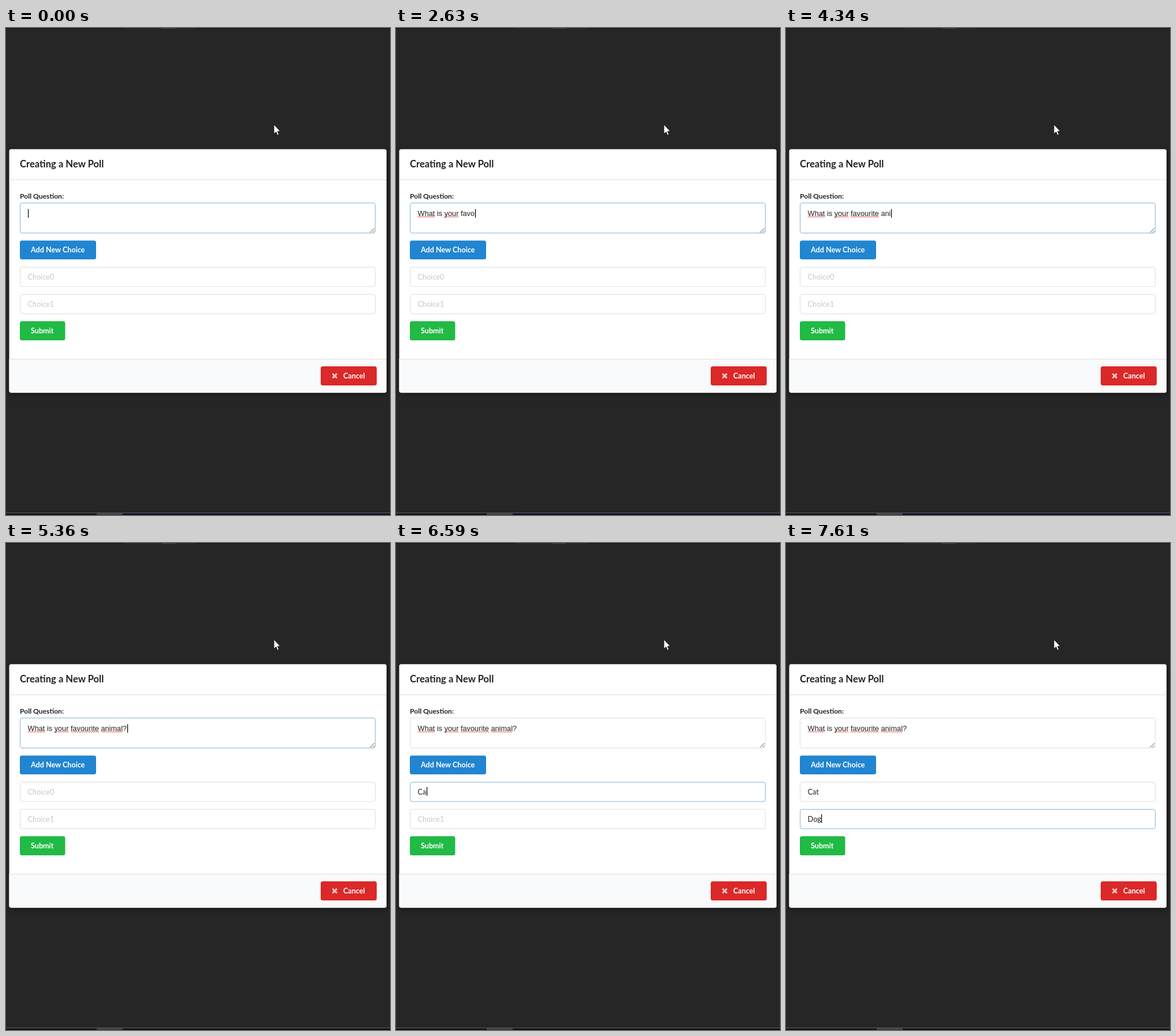
Write an HTML page that moves like this. It is 665 by 842 pixels and loops after 8000 ms.

```html
<!DOCTYPE html>
<html lang="en">
<head>
<meta charset="utf-8">
<title>New poll</title>
<style>
  html, body { margin: 0; width: 100%; height: 100%; overflow: hidden; background: #262626; }
  svg { display: block; }
  text { font: 12.7px Lato, sans-serif; fill: #212121; white-space: pre; }
  .bold { font-weight: 700; }
  .button { font-weight: 700; font-size: 12.6px; fill: #fff; }
  #question { font: 12.75px "Liberation Sans", Arial, sans-serif; }
  .field { fill: #fff; }
  .dialog { filter: drop-shadow(1px 3px 6px rgba(0, 0, 0, .4)); }
</style>
</head>
<body>
<svg width="665" height="842" viewBox="0 0 665 842">
  <defs>
    <pattern id="wave" width="4" height="3" y="325" patternUnits="userSpaceOnUse">
      <path d="M-1 1.5L0 2.5L2 .5L4 2.5L5 1.5" fill="none" stroke="#f02020" stroke-width=".9"/>
    </pattern>
  </defs>

  <rect width="665" height="842" fill="#262626"/>
  <path d="M0 .5H665" stroke="#121212"/>
  <path d="M205 .5H330" stroke="#1d2a1b"/>
  <path d="M270 .5H295" stroke="#35552f"/>
  <rect y="838" width="665" height="1" fill="#48688a"/>
  <rect y="839" width="665" height="3" fill="#15110f"/>
  <rect y="840" width="157" height="2" fill="#24100a"/>
  <rect x="157" y="839" width="45" height="3" fill="#493b37"/>

  <rect class="dialog" x="5.5" y="209.5" width="653.5" height="421" rx="3.5" fill="#fff"/>
  <path d="M5.5 572H659V627a3.5 3.5 0 0 1-3.5 3.5H9a3.5 3.5 0 0 1-3.5-3.5Z" fill="#f9fafb"/>
  <path d="M5.5 262.5H659M5.5 572.5H659" stroke="#dedede"/>
  <text class="bold" x="24" y="241" style="font-size:16.6px">Creating a New Poll</text>
  <text class="bold" x="24" y="295" style="font-size:12.1px">Poll Question:</text>

  <rect class="field" x="24.5" y="302.5" width="615" height="52" rx="3.5"/>
  <path d="M630.5 353.5L638 346M635 353.5L638 350.5" stroke="#555"/>
  <rect class="field" x="24.5" y="413.5" width="615" height="33.5" rx="3.5"/>
  <rect class="field" x="24.5" y="460.5" width="615" height="33.5" rx="3.5"/>
  <g id="squiggles" fill="url(#wave)"></g>
  <text id="question" x="37.6" y="325"></text>
  <text id="choice0" x="37.6" y="435"></text>
  <text id="choice1" x="37.6" y="482"></text>
  <rect id="caret" width="1.2" height="15" fill="#000"/>

  <rect x="24" y="367.5" width="132" height="32.5" rx="3.5" fill="#2185d0"/>
  <text class="button" x="43" y="388">Add New Choice</text>
  <rect x="24" y="507" width="78.5" height="33" rx="3.5" fill="#21ba45"/>
  <text class="button" x="43" y="528">Submit</text>
  <rect x="545" y="585" width="97" height="33" rx="3.5" fill="#db2828"/>
  <path d="M565.5 597.7L573 605.2M573 597.7L565.5 605.2" stroke="#f4c9c9" stroke-width="3"/>
  <text class="button" x="584" y="606">Cancel</text>

  <path d="M464 167V183L467.7 179.6L470.2 185.3L472.6 184.2L470.2 178.7H475Z"
        fill="#fff" stroke="#111" stroke-width=".8"/>
</svg>
<script>
const LOOP = 8000, FADE = 150;
const $ = id => document.getElementById(id);
const borders = document.querySelectorAll('.field');

// Each burst: typed text, time of its first key, time of its last key
const fields = [
  { node: $('question'), focus: -FADE, caretY: 313, hint: '', bursts: [
    ['W', 210], ['ha', 530, 680], ['t is ', 1000, 1380], ['your favo', 1700, 2630],
    ['urite an', 3170, 4040], ['i', 4340], ['mal', 4660, 4810], ['?', 5130]] },
  { node: $('choice0'), focus: 5470, caretY: 422, hint: 'Choice0',
    bursts: [['C', 6130], ['at', 6510, 6600]] },
  { node: $('choice1'), focus: 6780, caretY: 469, hint: 'Choice1',
    bursts: [['D', 7230], ['og', 7530, 7610]] }
];

const clamp = v => Math.max(0, Math.min(1, v));
const mix = (a, b, k) => `rgb(${a.map((v, i) => Math.round(v + (b[i] - v) * k))})`;

function typed(bursts, t) {
  return bursts.map(([text, start, end = start + 1]) => {
    if (t < start) return '';
    const progress = clamp((t - start) / (end - start));
    return text.slice(0, 1 + Math.floor(progress * (text.length - 1) + 1e-6));
  }).join('');
}

// Spelling marks appear once the character after the word is typed
const { node: question, bursts } = fields[0];
question.textContent = typed(bursts, LOOP);
const squiggles = [...question.textContent.matchAll(/\w{3,}/g)].map(({ 0: word, index }) => {
  const mark = document.createElementNS('http://www.w3.org/2000/svg', 'rect');
  const x = question.getStartPositionOfChar(index).x;
  const attributes = { x, y: 325, height: 3, width: question.getSubStringLength(index, word.length) };
  for (const name in attributes) mark.setAttribute(name, attributes[name]);
  $('squiggles').append(mark);
  return { mark, end: index + word.length };
});

function draw(t) {
  const active = fields.findLastIndex(field => t >= field.focus);
  fields.forEach(({ node, focus, caretY, hint, bursts }, i) => {
    const value = typed(bursts, t);
    const next = fields[i + 1];
    const glow = clamp((t - focus) / FADE) - (next ? clamp((t - next.focus) / FADE) : 0);
    borders[i].style.stroke = mix([222, 222, 223], [133, 183, 217], glow);
    node.textContent = value || hint;
    node.style.fill = value ? '#212121' : i === active ? '#858585' : '#c7c7c7';
    if (i === active) {
      const width = value ? node.getComputedTextLength() : 0;
      $('caret').setAttribute('x', Math.round(38 + width));
      $('caret').setAttribute('y', caretY);
    }
  });
  const length = typed(bursts, t).length;
  squiggles.forEach(({ mark, end }) => mark.style.display = length > end ? '' : 'none');
}

const begin = performance.now();
function tick() {
  draw((performance.now() - begin) % LOOP);
  requestAnimationFrame(tick);
}
tick();
</script>
</body>
</html>
```
